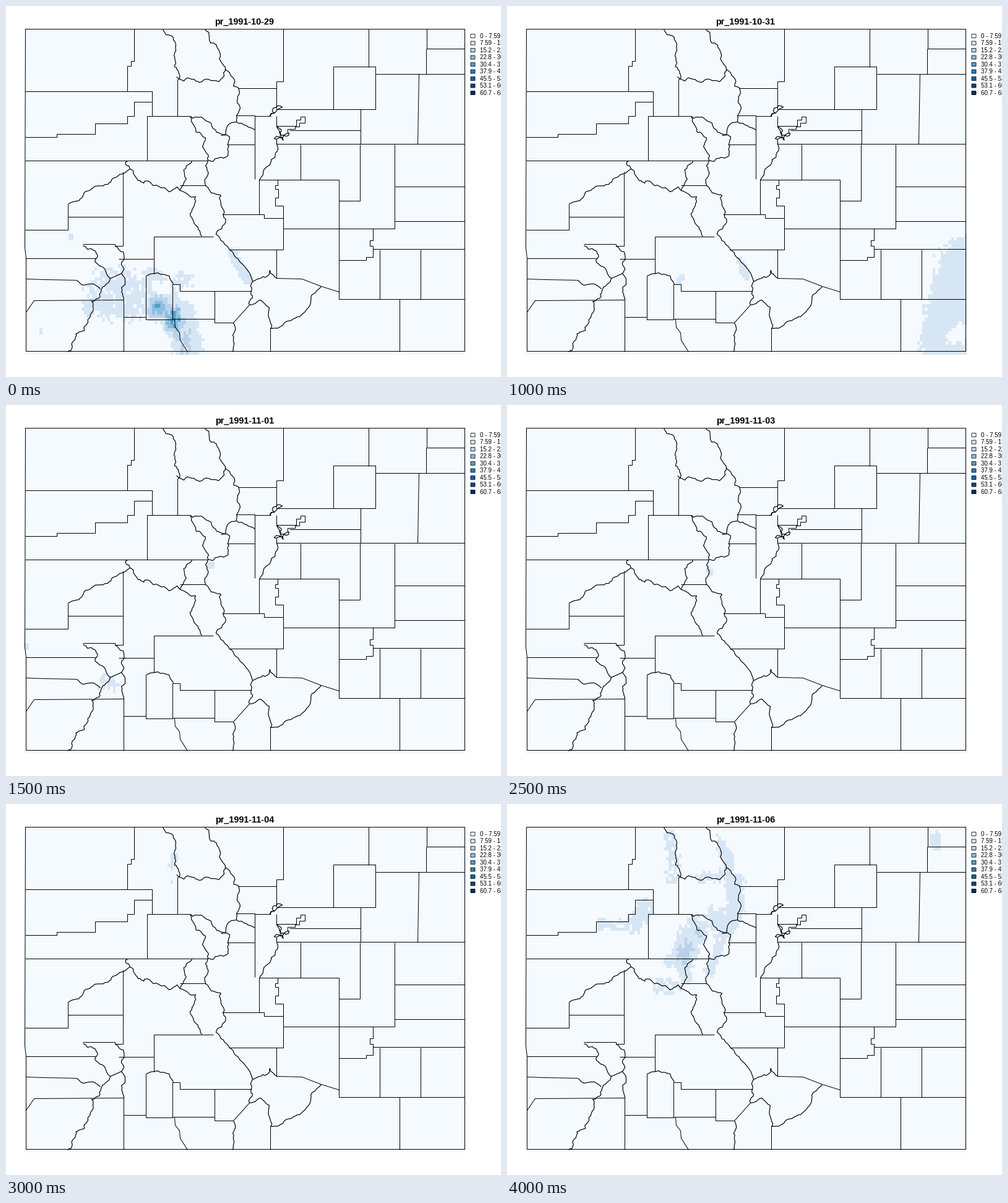
Recreate the animation shown at these times as a matplotlib script. Size 800x600 px, loop 4500 ms.

```python
import numpy as np
import matplotlib.pyplot as plt
from matplotlib.animation import FuncAnimation
from matplotlib.collections import LineCollection
from matplotlib.colors import ListedColormap
from matplotlib.patches import Rectangle

W, H, DPI = 800, 600, 100
PX = 72 / DPI
COLORS = ["#f5faff", "#d7e6f5", "#bad1eb", "#89bedc", "#529dcc",
          "#2c7cba", "#1460a8", "#08458a", "#082a60"]

# Raster geometry
X0, Y0, CW, CH, COLS, ROWS = 29, 36.8, 4.22, 5.43, 169, 97
cx, cy = np.meshgrid(X0 + CW * (np.arange(COLS) + .5), Y0 + CH * (np.arange(ROWS) + .5))


def pairs(xy):
    return np.reshape(np.array(xy, float), (-1, 2))


def distance(xy):
    """Distance of every cell from a point or polyline."""
    pts = pairs(xy)
    best = np.hypot(cx - pts[0, 0], cy - pts[0, 1])
    for a, b in zip(pts[:-1], pts[1:]):
        d = b - a
        t = np.clip(((cx - a[0]) * d[0] + (cy - a[1]) * d[1]) / (d @ d), 0, 1)
        best = np.minimum(best, np.hypot(cx - a[0] - t * d[0], cy - a[1] - t * d[1]))
    return best


class Rain:
    """Rainfall in class units, built from bands that fade out at their reach."""

    def __init__(self, seed):
        self.rng = np.random.default_rng(seed)
        self.z = np.zeros((ROWS, COLS))

    def storm(self, peak, reach, *xy, noise=.08):
        v = peak ** (1 - (distance(xy) / reach) ** 2)
        v *= np.exp(self.rng.normal(0, noise, v.shape))
        self.z = np.maximum(self.z, np.minimum(v, peak))

    def light(self, reach, *xy, noise=.08):
        self.storm(1.6, reach, *xy, noise=noise)

    def patchy(self, reach, *xy):
        self.light(reach, *xy, noise=.4)

    def dry(self, reach, *xy):
        ragged = distance(xy) + self.rng.normal(0, 2, self.z.shape)
        self.z[ragged < reach] = 0

    def classes(self):
        return np.clip(np.floor(self.z), 0, 8)


def oct29(r):
    r.light(5, 105, 372)
    r.light(4, 56, 525)
    r.patchy(24, 160, 458, 180, 448, 215, 458)
    r.patchy(14, 138, 485, 205, 495)
    r.patchy(13, 285, 442)
    r.light(18, 240, 440, 262, 470, 245, 485, noise=.2)
    r.storm(4, 26, 247, 487, noise=.15)
    r.storm(4.4, 20, 270, 498, 270, 512, noise=.15)
    r.storm(2.2, 22, 275, 500, 290, 550, noise=.2)
    r.light(20, 285, 495, 298, 548)
    r.light(8, 365, 400, 390, 442)
    r.dry(10, 244, 454, 258, 456)


def oct30(r):
    # eastern plains
    r.light(55, 742, 150, 690, 200, 675, 250, 735, 255)
    r.storm(2.5, 38, 735, 160, 712, 195)
    r.storm(2.3, 15, 686, 259)
    # broad central band
    r.light(46, 548, 275, 495, 325, 480, 400, 480, 470, 458, 520)
    r.light(38, 375, 372, 415, 410, 440, 500)
    r.light(26, 345, 490, 385, 515, 385, 545)
    r.light(24, 260, 418, 330, 438, 380, 455, noise=.2)
    r.storm(2.6, 46, 398, 400, 425, 455)
    r.storm(2.4, 20, 430, 500)
    # high valleys
    r.light(24, 312, 312, 332, 352)
    r.light(15, 298, 276)
    r.light(16, 390, 255, 390, 268)
    r.patchy(14, 220, 292, 285, 302)
    # south-western ranges
    r.storm(2.8, 38, 165, 458, 215, 440, noise=.25)
    r.storm(2.7, 46, 225, 490, 230, 540, 300, 530, noise=.15)
    r.patchy(20, 115, 545, 180, 515)
    r.storm(5, 30, 200, 465, 262, 490, 310, 495, noise=.35)
    r.storm(8.8, 36, 248, 487, noise=.25)
    r.storm(9.4, 38, 272, 498, 284, 498, noise=.25)
    r.storm(8, 28, 267, 508, 276, 530, 296, 562, noise=.2)
    r.storm(3.8, 34, 275, 515, 302, 550, noise=.25)
    r.storm(6, 25, 274, 448, 305, 426, noise=.25)
    r.storm(7.2, 15, 367, 398, 394, 446, noise=.12)
    r.dry(13, 238, 452, 254, 456)
    # south-eastern patches
    r.light(16, 577, 422)
    r.light(14, 621, 420)
    r.light(16, 652, 490, 655, 550, noise=.25)


def oct31(r):
    r.light(45, 742, 418, 718, 500, 712, 560)
    r.dry(13, 724, 534, 732, 524)
    r.light(6, 375, 410, 388, 438)
    r.light(5, 277, 444, 283, 436)


def nov1(r):
    r.light(7, 31, 390)
    r.patchy(10, 160, 448, 175, 455)
    r.light(6, 330, 260)


def nov2(r):
    r.light(6, 331, 238, 326, 280)
    r.patchy(7, 232, 297, 254, 300, 260, 324)
    r.patchy(6, 222, 328, 285, 336, 308, 345, 312, 362)
    r.patchy(6, 252, 396, 285, 389, 315, 386)
    r.light(5, 373, 400, 386, 424)
    r.light(9, 434, 434, 445, 438, noise=.2)
    r.patchy(19, 158, 440, 178, 454)
    r.patchy(9, 196, 418, 200, 442)
    r.patchy(8, 222, 426, 248, 430)
    r.patchy(5, 154, 483, 172, 482)


def nov3(r):
    r.light(5, 325, 262, 328, 272)


def nov4(r):
    r.light(6, 273, 84, 268, 100)
    r.light(4, 267, 126)


def north_west(r, size):
    r.patchy(9 * size, 262, 52, 270, 88, 270, 118)
    r.light(9 * size, 345, 62, 360, 100, noise=.2)
    r.light(15 * size, 368, 128, 370, 168, 356, 195, noise=.15)
    r.light(13 * size, 222, 165, 205, 196, noise=.2)
    r.patchy(8 * size, 152, 194, 190, 194)
    r.light(20 * size, 302, 202, 285, 244, noise=.2)
    r.light(9 * size, 280, 245, 262, 254, noise=.2)
    r.patchy(10 * size, 246, 293, 272, 296)
    r.light(8 * size, 345, 224, 327, 270, noise=.2)


def nov5(r):
    north_west(r, .8)


def nov6(r):
    north_west(r, 1)
    r.patchy(9, 315, 122, 345, 115)
    r.light(14, 335, 180, 350, 205, noise=.2)
    r.light(10, 282, 256, 290, 280, noise=.2)
    r.storm(2.5, 20, 290, 232, 286, 246, noise=.15)
    r.storm(2.3, 16, 308, 210)
    r.light(9, 692, 54, 692, 66)


DAYS = {"10-29": oct29, "10-30": oct30, "10-31": oct31, "11-01": nov1, "11-02": nov2,
        "11-03": nov3, "11-04": nov4, "11-05": nov5, "11-06": nov6}
frames = []
for i, (date, paint) in enumerate(DAYS.items()):
    rain = Rain(40 + i)
    paint(rain)
    frames.append((date, rain.classes()))

# County borders
borders, rivers = [], []
wiggle = np.random.default_rng(7)


def line(*xy):
    borders.append(pairs(xy) + .5)


def stair(x, y, *stops, down=False):
    """Right-angled path; stops alternate between x and y, starting with x unless down."""
    pts = [(x, y)]
    for s in stops:
        x, y = (x, s) if down else (s, y)
        pts.append((x, y))
        down = not down
    borders.append(np.array(pts) + .5)


def across(y, x0, x1):
    stair(x0, y, x1)


def upright(x, y0, y1):
    stair(x, y0, y1, down=True)


def crooked(a, b, rough):
    """Points from a up to b, displaced at each halving."""
    d = b - a
    if np.hypot(*d) < 5:
        return [a]
    mid = (a + b) / 2 + np.array([-d[1], d[0]]) * np.clip(wiggle.normal(0, rough), -.3, .3)
    return crooked(a, mid, rough) + crooked(mid, b, rough)


def river(*xy, rough=.14):
    pts = pairs(xy)
    out = [p for a, b in zip(pts[:-1], pts[1:]) for p in crooked(a, b, rough)]
    rivers.append(np.array(out + [pts[-1]]) + .5)


line(31, 37, 741, 37, 741, 558, 32, 558, 32, 408, 30, 390, 31, 37)
# north-west
stair(207, 37, 89, 202, 97, 196, 138, down=True)
stair(31, 138, 236, 178)
stair(31, 212, 82, 207, 144, 190, 196, 178, 207, 155, 236)
stair(297, 178, 228, 250)
across(250, 31, 326)
upright(277, 119, 178)
river(253, 37, 258, 46, 270, 51, 274, 62, 271, 80, 274, 92, 272, 98, 277, 119)
river(275, 114, 287, 121, 300, 118, 312, 123, 343, 122, 352, 113, 354, 102)
river(321, 37, 328, 50, 346, 78, 354, 102, 366, 115, 377, 140, 378, 165, 372, 177, 372, 187)
river(372, 187, 388, 193, 402, 200)
river(372, 187, 357, 194, 347, 209)
river(297, 178, 331, 189, 340, 204, 361, 211, 358, 224, 334, 251, 326, 249)
river(297, 178, 299, 186, 322, 213, 317, 227, 326, 249)
river(300, 250, 291, 258, 288, 272, 281, 298)
river(326, 249, 322, 258, 326, 272, 322, 290)
across(290, 281, 323)
# north-east
stair(448, 37, 122, 437, 167, down=True)
across(133, 375, 437)
stair(372, 177, 402, 280)
across(178, 402, 428)
stair(437, 167, 597, 98, 529, 167)
upright(586, 37, 99)
across(110, 597, 741)
stair(680, 37, 69, 741, down=True)
upright(679, 69, 110)
line(667, 110, 665, 223)
upright(573, 167, 223)
across(201, 458, 573)
across(224, 357, 402)
across(223, 437, 741)
stair(437, 178, 194, 469, 184, 476, 179, 483, 189, 474, 195, 467, 199, 455, 205, down=True)
for x0, y0, x1, y1 in [(426, 178, 446, 163), (433, 214, 457, 205), (437, 194, 443, 209)]:
    river(x0, y0, x1, y1, x0, y0, rough=.3)
river(437, 216, 437, 223, 428, 248, 409, 281)
# west
river(196, 250, 193, 256, 200, 263, 213, 282, 232, 284, 246, 291, 263, 300, 276, 292, 281, 298)
river(200, 263, 183, 272, 164, 288, 143, 291, 126, 301, 122, 310, 100, 320, rough=.08)
stair(100, 320, 362, 31, down=True)
across(341, 100, 189)
stair(189, 268, 388, 176, 385, 124, down=True)
river(281, 298, 306, 308, 297, 335, 303, 350, 316, 372)
river(322, 290, 328, 297, 347, 306, 347, 322, 353, 352, 348, 360, 339, 369)
# centre and east
stair(349, 337, 417, 343, 448)
stair(409, 337, 281, 538, 474, 741, down=True)
stair(439, 281, 290, 435, 296, 440, 310, 435, 323, 448, 394, 360, down=True)
stair(448, 360, 628, 224)
upright(476, 224, 281)
stair(572, 224, 315, 538, down=True)
for y in 292, 348:
    across(y, 628, 741)
across(393, 593, 741)
stair(593, 360, 379, 588, 388, 593, 406, 582, 411, 538, down=True)
for x in 604, 670:
    upright(x, 394, 474)
upright(636, 474, 559)
line(437, 394, 437, 440, 478, 441, 509, 453, 538, 462)
upright(427, 520, 559)
river(509, 453, 490, 485, 474, 502, 428, 521, 425, 487, 411, 475, 393, 483, rough=.08)
river(437, 440, 426, 427, 421, 437, 398, 445, 396, 460, 393, 483)
river(339, 369, 361, 394, 378, 414, 398, 445, rough=.08)
# south-west
across(408, 32, 145)
across(409, 182, 239)
river(124, 387, 131, 393, 143, 395, 144, 414, 168, 440, 153, 460, 138, 477, 136, 499,
      117, 527, 99, 559)
river(176, 388, 187, 413, 186, 432, 168, 440)
river(186, 432, 192, 450, 190, 475)
line(32, 441, 60, 442, 112, 443)
river(112, 443, 124, 451, 136, 449, 152, 457)
line(32, 495, 45, 476, 190, 475, 190, 559)
across(503, 190, 226)
upright(239, 373, 433)
across(373, 239, 335)
river(226, 436, 240, 432, 270, 449)
stair(226, 436, 507, 269, 450, 281, 461, 397, down=True)
across(506, 269, 337)
stair(337, 461, 512, 367, down=True)
line(272, 506, 273, 519, 280, 528, 281, 540, 293, 559)
line(393, 483, 367, 512)
river(367, 512, 370, 520, 366, 532, 366, 559)

fig = plt.figure(figsize=(W / DPI, H / DPI), dpi=DPI, facecolor="white")
ax = fig.add_axes([0, 0, 1, 1])
raster = ax.imshow(frames[0][1], cmap=ListedColormap(COLORS), vmin=-.5, vmax=8.5,
                   extent=(X0, X0 + CW * COLS, Y0 + CH * ROWS, Y0),
                   interpolation="nearest", aspect="auto")
ax.set(xlim=(0, W), ylim=(H, 0))
ax.axis("off")
for paths, width in (borders, 1), (rivers, 1.2):
    ax.add_collection(LineCollection(paths, colors="black", linewidths=width * PX, snap=False))
title = ax.text(385.5, 30, "", ha="center", va="baseline", family="Liberation Sans",
                weight="bold", size=14.4 * PX)
for i, color in enumerate(COLORS):
    y = 48.2 + 11.5 * i
    low, high = (f"{7.588 * k:.3g}" for k in (i, i + 1))
    ax.add_patch(Rectangle((751, y - 2.7), 7, 6, fc=color, ec="black", lw=.8 * PX, snap=False))
    ax.text(766.5, y + 3.6, f"{low} - {high}", va="baseline",
            family="Liberation Sans", size=9.8 * PX)


def draw(i):
    date, grid = frames[i]
    raster.set_data(grid)
    title.set_text("pr_1991-" + date)
    return raster, title


anim = FuncAnimation(fig, draw, frames=len(frames), interval=500, repeat=True, repeat_delay=0)
plt.show()
```
